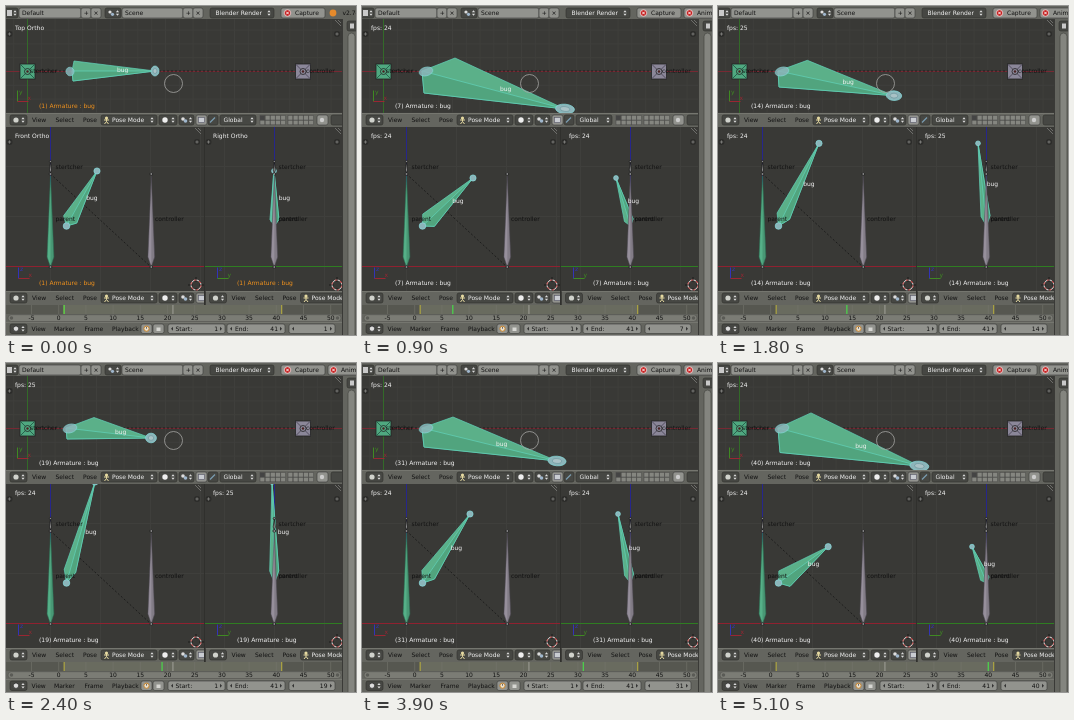
Animation, 350 px wide and 329 px high, one loop 5.4 s. Source, as an HTML page:

```html
<!DOCTYPE html>
<html lang="en">
<head>
<meta charset="utf-8">
<title>Armature playback</title>
<style>
html, body { margin: 0; width: 100%; height: 100%; overflow: hidden; background: #393936; }
#stage { display: block; width: 350px; height: 329px; font: 6px "DejaVu Sans", sans-serif; }
text { fill: #111; white-space: pre; }
.w { fill: #f2f2f2; }
.grid { stroke: #3f3f3c; }
.btn { fill: #464743; stroke: #30302d; stroke-width: .6; }
.field { fill: #92938e; stroke: #3c3c3a; stroke-width: .6; }
.dash { stroke: #161616; stroke-width: .8; stroke-dasharray: 2 2; fill: none; }
.green { fill: #55b088; stroke: #2b7257; stroke-width: .5; }
.gray { fill: #968f9b; stroke: #4b4750; stroke-width: .5; }
.bug { fill: #5bb089; stroke: #62d3bb; stroke-width: .7; stroke-linejoin: round; }
.side { fill: #51a47e; }
.ball { fill: #8cb5ba; stroke: #86dcdc; stroke-width: .7; }
.tip { fill: #8a8a8a; stroke: #181818; stroke-width: .7; }
</style>
</head>
<body>
<svg id="stage" viewBox="0 0 350 329"></svg>
<script>
const STEP = 300;
const FRAMES = [1, 2, 5, 7, 9, 12, 14, 17, 19, 22, 24, 26, 29, 31, 33, 36, 38, 40];
const FAST = [6, 8, 10, 15];          // steps whose rate reads 25
const SLOW = { 1: '14.63', 2: '20.58' };
const MID = 21;

const RED = '#8f2130', GREEN = '#2f7d22', BLUE = '#26268c', BAR = '#64655f';

// distance from the middle frame: top tail x,y, upper corner, lower corner, front tail x,y, right tail x
const KEYS = [
  [0, 139, 72, 87, 55, 61, 75, 86, 117, 267],
  [2, 145, 75, 88, 54.5, 61, 76, 89, 119, 266],
  [3, 150, 77, 90, 55, 61, 77, 91, 120, 266],
  [9, 189, 96, 89, 54, 61, 83, 106, 146, 257],
  [10, 195, 98, 91, 54, 62, 84, 108, 151, 256],
  [14, 203, 103, 93, 52, 62, 87, 111, 172, 254],
  [20, 201, 103, 93, 49.5, 62, 90, 110, 186, 254]
];
const REST = [0, 149, 65, 68, 55, 67, 75, 91, 165, 268];

const text = (x, y, s, c = '', more = '') => `<text x="${x}" y="${y}" class="${c}" ${more}>${s}</text>`;
const rect = (x, y, w, h, fill, more = '') => `<rect x="${x}" y="${y}" width="${w}" height="${h}" fill="${fill}" ${more}/>`;
const box = (x, y, w, h, c) => `<rect x="${x}" y="${y}" width="${w}" height="${h}" rx="2" class="${c}"/>`;
const line = (x1, y1, x2, y2, color, more = '') => `<path d="M${x1} ${y1}L${x2} ${y2}" stroke="${color}" ${more}/>`;
const dot = (x, y, r, fill, more = '') => `<circle cx="${x}" cy="${y}" r="${r}" fill="${fill}" ${more}/>`;
const oval = (x, y, rx, ry, turn, more) => `<ellipse cx="${x}" cy="${y}" rx="${rx}" ry="${ry}" transform="rotate(${turn} ${x} ${y})" ${more}/>`;
const poly = (pts, c) => `<polygon points="${pts.join(' ')}" class="${c}"/>`;
const arrows = (x, y) => `<path d="M${x - 1.6} ${y - .8}l1.6 -2 1.6 2zM${x - 1.6} ${y + .8}l1.6 2 1.6 -2z" fill="#ddd"/>`;
const view = (x, y, w, h, body) =>
  `<svg x="${x}" y="${y}" width="${w}" height="${h}" viewBox="${x} ${y} ${w} ${h}">${body}</svg>`;

function grid(x, y, w, h, ox, oy, gap) {
  let d = '';
  for (let i = ox - gap * Math.floor((ox - x) / gap); i < x + w; i += gap) d += `M${i + .5} ${y}v${h}`;
  for (let j = oy - gap * Math.floor((oy - y) / gap); j < y + h; j += gap) d += `M${x} ${j + .5}h${w}`;
  return rect(x, y, w, h, '#393936') + `<path d="${d}" class="grid"/>`;
}

const upright = (x, c) =>
  poly([[x, 261], [x - 3.4, 251], [x, 170], [x + 3.4, 251]], c) +
  poly([[x, 261], [x, 170], [x + 3.4, 251]], '') .replace('class=""', 'fill="#0002"') +
  dot(x, 168, 1.4, '', 'class="tip"') + dot(x, 261, 1.4, '', 'class="tip"');

const stretcher = x => poly([[x, 167], [x - 1.1, 164], [x, 156], [x + 1.1, 164]], 'tip') + dot(x, 155.5, 1.1, '', 'class="tip"');

const axes = (x, y, up, upName, side, sideName) =>
  line(x, y, x, y - 11, up) + line(x, y, x + 11, y, side) +
  text(x + 1.5, y - 8, upName, '', `style="fill:${up}"`) + text(x + 10, y - 2, sideName, '', `style="fill:${side}"`);

const cursor = (x, y) =>
  dot(x, y, 5, 'none', 'stroke="#eee"') +
  dot(x, y, 5, 'none', 'stroke="#c33" stroke-dasharray="2.6 2.6"') +
  `<path d="M${x - 8} ${y}h5M${x + 3} ${y}h5M${x} ${y - 8}v5M${x} ${y + 3}v5" stroke="#111" stroke-width=".7"/>`;

const plus = (x, y) =>
  dot(x, y, 3, '#2c2c2a') +
  `<path d="M${x - 1.6} ${y}h3.2M${x} ${y - 1.6}v3.2" stroke="#858582" stroke-width=".8"/>`;

// collapsed-panel buttons and the corner grip
const corners = (left, rightX, y) => plus(left + 3.5, y + 15) + plus(rightX, y + 15) +
  `<path d="M${rightX - 2} ${y + 1}l6 6M${rightX + 1} ${y + 1}l3 3" stroke="#858582" stroke-width=".7"/>`;

const marker = (x, y, fill, c) =>
  rect(x - 7.5, y - 7.5, 15, 15, fill, 'stroke="#222" stroke-width=".8"') +
  `<path d="M${x - 7} ${y - 7}l14 14M${x + 7} ${y - 7}l-14 14" stroke="${c}" stroke-width=".8"/>` +
  dot(x, y, 3, fill, 'stroke="#222" stroke-width=".8"') + dot(x, y, 1.2, '#4a2222');

// header of a 3D view
function bar(x, y, w) {
  const m = y + 7;
  let s = rect(x, y, w, 14, BAR) + line(x, y + .4, x + w, y + .4, '#7d7e78', 'stroke-width=".8"') +
    box(x + 4, y + 2, 17, 10, 'btn') + dot(x + 10, m, 2.6, '#d0d2cc') + arrows(x + 17, m);
  ['View', 'Select', 'Pose'].forEach((t, i) => s += text(x + [26, 49.5, 77][i], y + 9.3, t));
  s += box(x + 95, y + 2, 56, 10, 'btn') + dot(x + 100.5, m - 2, 1.6, '#e5d9a0') +
    `<path d="M${x + 98} ${m}h5M${x + 100.5} ${m - 1}v2.5l-2 2.5m2 -2.5l2 2.5" stroke="#e5d9a0" fill="none"/>` +
    text(x + 106, y + 9.3, 'Pose Mode', 'w') + arrows(x + 146, m) +
    box(x + 153, y + 2, 18, 10, 'btn') + dot(x + 159, m, 2.7, '#eee') + arrows(x + 167, m) +
    box(x + 173, y + 2, 15, 10, 'btn') + dot(x + 177, m - 1, 1.8, '#ddd') + dot(x + 179.5, m + 1, 1.8, '#9fb6cc') + arrows(x + 184.5, m) +
    box(x + 190, y + 2, 11, 10, 'field') + rect(x + 192.5, m - 2.5, 6, 5, '#c9ccd2', 'stroke="#556" stroke-width=".6"') +
    box(x + 202, y + 2, 10, 10, 'btn') + line(x + 204, m + 2.5, x + 209, m - 2.5, '#7a9bb0', 'stroke-width="1.2"') +
    box(x + 214, y + 2, 36, 10, 'btn') + text(x + 217.5, y + 9.3, 'Global', 'w') + arrows(x + 246, m);
  for (let i = 0; i < 20; i++)
    s += rect(x + 254 + i % 10 * 5.2 + (i % 10 > 4 ? 2 : 0), y + 2.5 + (i > 9 ? 4.8 : 0), 4.8, 4.5, i ? '#858680' : '#444', 'stroke="#4a4a48" stroke-width=".5"');
  return view(x, y, w, 14, s + box(x + 311, y + 2, 11, 10, 'field') + dot(x + 316, m, 2.2, '#ccc') + box(x + 325, y + 2, 16, 10, 'btn'));
}

const stop = x => dot(x, 7, 3.3, '#c62222', 'stroke="#e9dada" stroke-width=".8"') +
  `<path d="M${x - 1.3} 5.7l2.6 2.6M${x + 1.3} 5.7l-2.6 2.6" stroke="#fff" stroke-width=".9"/>`;

function info() {
  const idField = (x, w, name) => box(x, 2, w, 10, 'field') + text(x + 3, 9.3, name);
  return rect(0, 0, 350, 13, BAR) +
    box(-2, 2, 14, 10, 'btn') + rect(1, 4, 5, 6, '#c9c9c9') + arrows(9, 7) + idField(13, 62, 'Default') +
    box(75, 2, 10, 10, 'field') + text(77.7, 9.2, '+') + box(85, 2, 10, 10, 'field') + text(87.5, 9.2, '×') +
    box(99, 2, 16, 10, 'btn') + dot(104, 6, 1.6, '#ddd') + dot(106.5, 8.3, 1.6, '#9fb6cc') + arrows(111.5, 7) + idField(116, 61, 'Scene') +
    box(177, 2, 10, 10, 'field') + text(179.7, 9.2, '+') + box(187, 2, 10, 10, 'field') + text(189.5, 9.2, '×') +
    box(204, 2, 64, 10, 'btn') + text(209.5, 9.3, 'Blender Render', 'w') + arrows(263, 7) +
    box(275, 2, 44, 10, 'field') + stop(281.5) + text(289, 9.3, 'Capture') +
    `<g id="idle">${dot(327, 7, 3.4, '#e58a2c')}${text(336.5, 9.3, 'v2.74')}</g>` +
    `<g id="live">${box(322, 2, 40, 10, 'field')}${stop(327.5)}${text(335, 9.3, 'Anim')}</g>`;
}

const frameX = n => 52.7 + 5.44 * n;

function timeline() {
  let s = rect(0, 299, 336, 17, '#565750') + rect(frameX(1), 299, frameX(41) - frameX(1), 9, '#696b5f');
  for (let n = -5; n <= 50; n += 5) s += line(frameX(n), 299, frameX(n), 308, '#74756c', 'stroke-width=".6"');
  s += rect(0, 308, 336, 8, BAR) + rect(2, 308.7, 333, 6.8, '#7b7c75', 'rx="3.4" stroke="#4c4d48" stroke-width=".5"') +
    dot(5.5, 312, 1.7, '#5a5b56') + dot(331.5, 312, 1.7, '#5a5b56');
  for (let n = -5; n <= 50; n += 5) s += text(frameX(n), 314.2, n, '', 'text-anchor="middle"');
  [1, 21, 41].forEach(n => s += line(frameX(n), 299, frameX(n), 308, n == MID ? '#a9a9a0' : '#c9bd3a', 'stroke-width=".9"'));
  s += '<path id="now" d="M0 299v9" stroke="#4ccf4c" stroke-width="1.3"/>';
  s += rect(0, 316, 336, 13, BAR) + line(0, 316.4, 336, 316.4, '#7d7e78', 'stroke-width=".8"') +
    box(4, 318, 17, 9.5, 'btn') + dot(10, 322.7, 2.7, '#ddd', 'stroke="#222" stroke-width=".7"') + arrows(17, 322.7);
  ['View', 'Marker', 'Frame', 'Playback'].forEach((t, i) => s += text([25.5, 48, 78.5, 106][i], 325, t));
  s += box(135, 318, 11, 9.5, 'field') + dot(140.5, 322.7, 2.6, '#e8e0d0', 'stroke="#c8842c"') + line(140.5, 322.7, 140.5, 320.8, '#333', 'stroke-width=".7"') +
    box(147, 318, 11, 9.5, 'field') + rect(150.5, 321.5, 4, 3.5, '#d6d6d2') +
    box(162, 318, 57, 9.5, 'field') + box(221, 318, 58, 9.5, 'field') + box(283, 318, 46, 9.5, 'field');
  [165, 224, 286].forEach(x => s += `<path d="M${x + 2} 320.7l-2 2 2 2z" fill="#333"/>`);
  [216, 276, 326].forEach(x => s += `<path d="M${x - 2} 320.7l2 2 -2 2z" fill="#333"/>`);
  return s + text(169.5, 325, 'Start:') + text(212, 325, '1', '', 'text-anchor="end"') +
    text(229, 325, 'End:') + text(272, 325, '41', '', 'text-anchor="end"') +
    text(321.5, 325, '', '', 'id="num" text-anchor="end"');
}

const sidebar = () => rect(336, 13, 14, 316, BAR) + line(336.5, 13, 336.5, 329, '#3a3a37') +
  box(341, 15, 12, 10, 'btn') + rect(344, 17.5, 4, 5, '#c9c9c9') +
  rect(342, 27, 7, 310, '#84857f', 'rx="3.5" stroke="#474844" stroke-width=".7"');

const captions = (id, x, y, infoX, infoY) => text(x, y, '', '', `id="${id}Rate"`) + text(infoX, infoY, '', '', `id="${id}Info"`);
const bugLabel = id => text(0, 0, 'bug', 'w', `id="${id}Label"`);

function build() {
  const top = grid(0, 13, 336, 94, 21, 65, 13.8) +
    line(0, 65.5, 336, 65.5, RED, 'opacity=".7"') + line(21.5, 13, 21.5, 107, GREEN, 'opacity=".7"') +
    '<path d="M29 65H290" class="dash"/>' + marker(21.5, 65.5, '#4fa880', '#1d5240') + marker(297, 65.5, '#8b8799', '#464152') +
    '<g id="top"></g>' + text(24, 67, 'stertcher') + text(300, 67, 'controller') + bugLabel('top') +
    dot(167.5, 77.5, 9, 'none', 'stroke="#a5a5a3" stroke-width=".8"') +
    axes(11.5, 95.5, '#3f8a22', 'y', '#9a2632', 'x') + corners(0, 331, 13) + captions('top', 9, 24, 33, 102);

  const front = grid(0, 121, 198, 164, 44, 260, 50) +
    line(0, 260.5, 198, 260.5, RED) + line(44.5, 121, 44.5, 261, BLUE) +
    '<path d="M44.5 168L145 261" class="dash"/>' + upright(44.5, 'green') + stretcher(44.5) + upright(145.3, 'gray') +
    '<g id="front"></g>' + text(49.5, 162.5, 'stertcher') + text(49.5, 214.5, 'parent') + text(149, 214.5, 'controller') + bugLabel('front') +
    axes(12.5, 272.5, '#3333b8', 'z', '#9a2632', 'x') + cursor(190, 279) + corners(0, 191, 121) + captions('front', 9, 132, 33, 279);

  const right = grid(199, 121, 137, 164, 268, 260, 50) +
    line(199, 260.5, 336, 260.5, GREEN) + line(268.5, 121, 268.5, 261, BLUE) +
    '<g id="right"></g>' + stretcher(268.3) + upright(268.3, 'gray') + '<g id="rightFront"></g>' +
    text(272.5, 162.5, 'stertcher') + text(272.5, 214.5, 'parent') + text(272.5, 214.5, 'controller') + bugLabel('right') +
    axes(211.5, 272.5, '#3333b8', 'z', '#3f8a22', 'y') + cursor(331, 279) + corners(199, 331, 121) + captions('right', 207, 132, 231, 279);

  return rect(0, 0, 350, 329, '#30302d') + info() +
    view(0, 13, 336, 94, top) + bar(0, 107, 336) +
    view(0, 121, 198, 164, front) + bar(0, 285, 198) +
    view(199, 121, 137, 164, right) + bar(199.5, 285, 137) +
    timeline() + sidebar();
}

// side view of the bug bone
function bone(hx, hy, tx, ty, w, ends = true) {
  const dx = tx - hx, dy = ty - hy, len = Math.hypot(dx, dy);
  const nx = dy / len * w, ny = -dx / len * w, bx = hx + dx * .12, by = hy + dy * .12;
  const a = [bx + nx, by + ny], b = [bx - nx, by - ny], h = [hx, hy], t = [tx, ty];
  return poly([h, a, t, b], 'bug') + poly([h, t, b], 'bug side') +
    (ends ? dot(hx, hy, 3.3, '', 'class="ball"') : '') + dot(tx, ty, ends ? 3.1 : 2.4, '', 'class="ball"');
}

function topBone(p, rest) {
  const [, x, y, ax, ay, bx, by] = p, far = Math.min(1, Math.max(0, (x - 139) / 62));
  const h = rest ? [66, 65] : [60, 65], rx = rest ? 4 : 5 + far * 4.5, ry = rest ? 5 : 4.8;
  return poly([h, [ax, ay], [x, y], [bx, by]], 'bug') + poly([h, [x, y], [bx, by]], 'bug side') +
    oval(64, 65.5, rest ? 4 : 7, 4.3, -15, 'class="ball" opacity=".85"') +
    oval(x, y, rx, ry, far * 5, 'class="ball"') +
    oval(x, y, rx * .5, ry * .5, far * 5, 'fill="#a9c2c6" stroke="#5d8c92" stroke-width=".5"');
}

function pose(frame) {
  if (frame == 1) return REST;
  const d = Math.abs(frame - MID), i = KEYS.findIndex(k => k[0] >= d);
  if (!i) return KEYS[0];
  const a = KEYS[i - 1], b = KEYS[i], u = (d - a[0]) / (b[0] - a[0]);
  return a.map((v, j) => v + (b[j] - v) * u);
}

const stage = document.getElementById('stage');
stage.innerHTML = build();
const $ = id => document.getElementById(id);

function place(id, hx, hy, tx, ty) {
  $(id + 'Label').setAttribute('x', (hx + tx) / 2 + 4.5);
  $(id + 'Label').setAttribute('y', (hy + ty) / 2 + 1);
}

function show(step) {
  const frame = FRAMES[step], rest = step == 0, p = pose(frame);
  const [, tx, ty, , , , , fx, fy, rx] = p;
  const w = rest ? 7.5 : 5.5 + Math.min(1, Math.abs(frame - MID) / 19) * 4;
  $('top').innerHTML = topBone(p, rest);
  $('front').innerHTML = bone(60.5, 220, fx, fy, w);
  $('right').innerHTML = bone(268.5, 220, rx, fy, 4.5, false);
  $('rightFront').innerHTML = rest ? line(265, 216, 267.5, 168, '#62d3bb', 'stroke-width=".7"') : '';
  place('top', 64, 65, tx, ty);
  place('front', 60.5, 220, fx, fy);
  place('right', 268.5, 220, rx, fy);

  for (const [id, name] of [['top', 'Top'], ['front', 'Front'], ['right', 'Right']]) {
    const isFront = id == 'front';
    const slow = SLOW[step] || (isFront && step == 5 ? '23.47' : '');
    const even = FAST.includes(step) && !isFront ? 25 : 24;
    $(id + 'Rate').textContent = rest ? name + ' Ortho' : 'fps: ' + (slow || even);
    $(id + 'Rate').style.fill = slow ? '#e8402c' : '#f2f2f2';
    $(id + 'Info').textContent = `(${frame}) Armature : bug`;
    $(id + 'Info').style.fill = rest ? '#f0921e' : '#f2f2f2';
  }
  $('idle').style.display = rest ? '' : 'none';
  $('live').style.display = rest ? 'none' : '';
  $('now').setAttribute('transform', `translate(${frameX(frame)} 0)`);
  $('num').textContent = frame;
}

let last = -1;
function tick() {
  const step = Math.floor(performance.now() / STEP) % FRAMES.length;
  if (step != last) show(last = step);
  requestAnimationFrame(tick);
}
tick();
</script>
</body>
</html>
```
